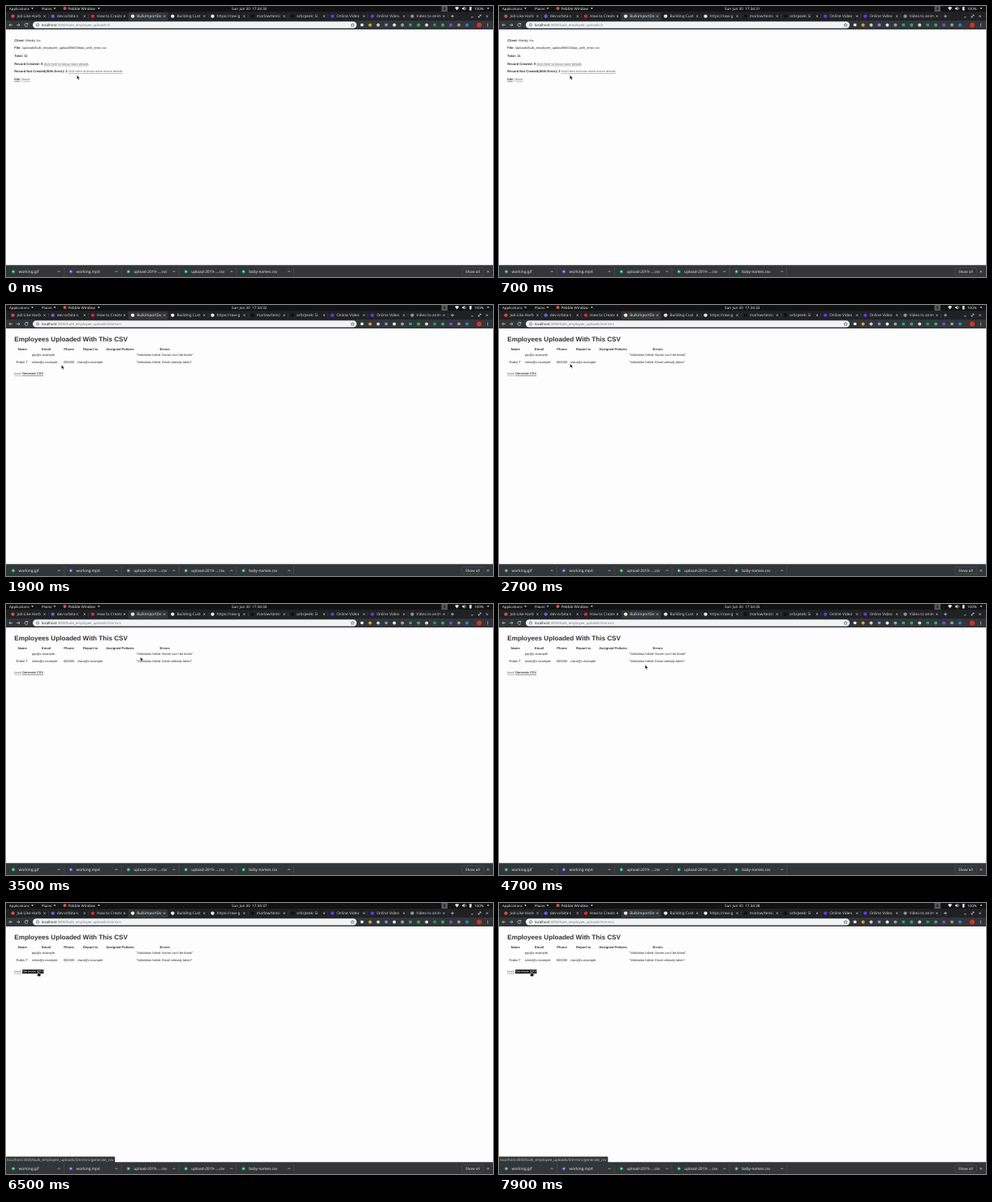
Write an HTML page that moves like this. It is 600x335 px and loops after 8 s.

```html
<!DOCTYPE html>
<html lang="en">
<head>
<meta charset="utf-8">
<title>CSV upload errors</title>
<style>
html, body { margin: 0; width: 100%; height: 100%; overflow: hidden; background: #fdfdfd; }
svg { display: block; width: 600px; height: 335px; }
text { white-space: pre; text-rendering: geometricPrecision; }
.ui { font-family: "Noto Sans", "Open Sans", sans-serif; }
.page { font: 4.0625px "Liberation Sans", Arial, sans-serif; fill: #333; }
.page .h1 { font-size: 8.125px; }
.b { font-weight: bold; }
.link { fill: #000; text-decoration: underline; }
.seen { fill: #666; text-decoration: underline; }
.hover .target { fill: #fff; }
.mark { visibility: hidden; }
.hover .mark { visibility: visible; }
.line { fill: none; stroke: #dfe1e3; stroke-width: .65; }
.dark { stroke: #5f6368; }
</style>
</head>
<body>
<svg id="stage" viewBox="0 0 600 335"></svg>
<script>
const stage = document.getElementById('stage');
const LOOP = 8000;
const LIGHT = '#e4e6e8', DIM = '#cdd0d3', BAR = '#323639', DARK = '#202124', FIELD = '#f1f3f4';
const HOST = 'localhost:3000/bulk_employee_uploads/3';

const rect = (x, y, w, h, fill, r = 0, more = '') =>
  `<rect x="${x}" y="${y}" width="${w}" height="${h}" fill="${fill}" rx="${r}" ${more}/>`;
const dot = (x, y, r, fill) => `<circle cx="${x}" cy="${y}" r="${r}" fill="${fill}"/>`;
const line = (d, cls = '') => `<path class="line ${cls}" d="${d}"/>`;
const ui = (x, y, s, size = 4.6, fill = LIGHT, more = '') =>
  `<text class="ui" x="${x}" y="${y}" font-size="${size}" fill="${fill}" ${more}>${s}</text>`;
const text = (x, y, s, cls = '', more = '') => `<text x="${x}" y="${y}" class="${cls}" ${more}>${s}</text>`;
const span = (cls, s) => `<tspan class="${cls}">${s}</tspan>`;
const cross = (x, y, r) => line(`M${x - r} ${y - r}l${2 * r} ${2 * r}m0 ${-2 * r}l${-2 * r} ${2 * r}`);
const caret = (x, y) => `<path d="M${x - 1.4} ${y - .7}h2.8l-1.4 1.7z" fill="${LIGHT}"/>`;

function desktopBar() {
  return rect(0, 0, 600, 7, '#121212') +
    ui(4, 4.6, 'Applications', 4.3) + caret(32.5, 3) +
    ui(44, 4.6, 'Places', 4.3) + caret(60, 3) +
    dot(72.5, 3, 2, '#dd5144') + ui(76.5, 4.6, 'Pebble Window', 4.6) + caret(114.3, 3) +
    ui(278, 4.6, '', 4.6, LIGHT, 'id="clock"') +
    rect(536.5, 0, 7.5, 7, '#55585a') + rect(539.3, 1.3, 1.8, 4, '#25282a', .8) +
    `<path d="M553 2q2.6-2.2 5.2 0l-2.6 3.4z" fill="${LIGHT}"/>` +
    `<path d="M562 2.2h1.3l1.6-1.4v4.6l-1.6-1.4H562z" fill="${LIGHT}"/>` + line('M566 1.6q1.2 1.5 0 3') +
    rect(571, 1, 2.5, 4.6, LIGHT, .4) + ui(577, 4.6, '100%', 4.5) + caret(594, 3);
}

function tabs() {
  const list = [
    ['Job Like Harb', '#d94a3f'], ['dev-orbita-s', '#6a5be0'], ['How to Create', '#e0262d'],
    ['BulkimportDe', '#f3ecd2'], ['Building Cust', LIGHT], ['https://raw-g', LIGHT],
    ['marlow/tensi', '#0f1011'], ['orb/peek: Si', '#0f1011'], ['Online Video', '#6336e6'],
    ['Online Video', '#6336e6'], ['Video to anim', '#8d9094']
  ];
  const PITCH = 49.2;
  let out = rect(0, 7, 600, 12, DARK) + rect(150.5, 8, 49, 11, BAR, 1.8);
  list.forEach(([label, color], i) => {
    const x = 8.5 + i * PITCH, active = i === 3;
    out += dot(x, 12.6, 2.2, color) + ui(x + 5.1, 14.3, label, 4.7, active ? LIGHT : DIM) +
      rect(x + 35, 9, 2.5, 8, active ? BAR : DARK, 0, 'opacity=".6"') + cross(x + 39, 12.6, 1.1);
    if (i !== 2 && !active) out += rect(x + 43.6, 10, .35, 5.4, '#5f6368');
  });
  return out + line('M548 12.6h4m-2-2v4') + line('M573 13.8h2.6') +
    line('M582 14l3-3m-1.6 0h1.6v1.6m-3-.2v1.6h1.6') + cross(592.6, 12.6, 1.2);
}

function toolbar() {
  const icons = ['#e8e8e8', '#e59a35', '#c9ccd0', '#7f8fd8', '#dfe5f2', '#999ea3', '#20a98a',
    '#2fae55', '#d5d7d9', '#20a05a', '#2fae70', '#7a48e0', '#9a9ea3', '#2f80d0'];
  let out = rect(0, 18, 600, 11, BAR) + rect(33, 19.2, 399, 8.4, FIELD, 4.2) +
    line('M8 23.4H4m1.8-1.8L4 23.4l1.8 1.8') +
    line('M13 23.4h4m-1.8-1.8l1.8 1.8l-1.8 1.8') +
    line('M26.6 22.2a2 2 0 1 0 .3 1.7m0-3v1.6h-1.6') +
    '<circle class="line dark" cx="39" cy="23.4" r="1.7"/>' + line('M39 23.2v1.2', 'dark') +
    ui(44, 25, 'localhost<tspan fill="#777b80">:3000/bulk_employee_uploads/3<tspan id="urlTail"></tspan></tspan>', 4.34, DARK) +
    line('M427 21.3l.6 1.5 1.6.1-1.2 1 .4 1.6-1.4-.9-1.4.9.4-1.6-1.2-1 1.6-.1z', 'dark');
  icons.forEach((color, i) => {
    const x = 438.6 + i * 9.95;
    out += i % 3 ? dot(x, 23.4, 2, color) : rect(x - 1.7, 21.7, 3.4, 3.4, color, .5);
  });
  out += dot(583, 23.4, 3, '#d93025');
  for (let i = -1; i < 2; i++) out += dot(593.5, 23.4 + i * 1.5, .5, LIGHT);
  return out;
}

function shelf() {
  const files = ['working.gif', 'working.mp4', 'upload-2019-....csv', 'upload-2019-....csv', 'baby-names.csv'];
  let out = rect(0, 320.3, 600, 14.7, BAR);
  files.forEach((name, i) => {
    const x = i * 70.9;
    out += dot(x + 9, 328.4, 2.1, i === 1 ? '#6b4fd8' : '#1fa463') + dot(x + 9, 328.4, .8, LIGHT) +
      ui(x + 15.6, 330.4, name, 4.7) +
      line(`M${x + 63.6} 329.1l1.5-1.5 1.5 1.5`) + rect(x + 71, 323, .4, 10.5, '#5f6368');
  });
  return out + rect(561.5, 323.7, 27, 9, 'none', 1.2, 'stroke="#5f6368" stroke-width=".4"') +
    ui(566, 330.4, 'Show all') + cross(593.8, 328.4, 1.2);
}

function recordPage() {
  const row = (i, s) => text(10.3, 43.7 + i * 9.69, s);
  return row(0, span('b', 'Client:') + ' Wexby Inc') +
    row(1, span('b', 'File:') + ' /uploads/bulk_employee_upload/file/3/data_with_error.csv') +
    row(2, span('b', 'Total: 11')) +
    row(3, span('b', 'Record Created: 9 ') + span('seen', 'click here to know more details')) +
    rect(76.8, 78.7, 67.2, 4.9, '#000', 0, 'class="mark"') +
    row(4, span('b', 'Record Not Created(With Error): 2 ') +
      span('seen target', 'click here to know more errors details')) +
    row(5, span('link', 'Edit') + ' | ' + span('seen', 'Back'));
}

function errorPage() {
  const heads = [['Name', 20.2], ['Email', 49.5], ['Phone', 77.5], ['Report to', 104],
    ['Assigned Policies', 140.5], ['Errors', 195.7]];
  return text(10.3, 45.3, 'Employees Uploaded With This CSV', 'h1 b') +
    heads.map(([s, x]) => text(x, 55.7, s, 'b', 'text-anchor="middle"')).join('') +
    text(32, 63.4, 'pip@x.example') + text(160.3, 63.4, '"Validation failed: Name can\'t be blank"') +
    text(12.6, 72, 'Robin T') + text(32, 72, 'robin@x.example') + text(70.8, 72, '000000') +
    text(88, 72, 'clara@x.example') + text(160.3, 72, '"Validation failed: Email already taken"') +
    text(10.3, 86.2, 'back', 'seen') + rect(19.9, 82.4, 26.5, 4.9, '#000', 0, 'class="mark"') +
    text(19.9, 86.2, 'Generate CSV', 'link target');
}

stage.innerHTML = rect(0, 0, 600, 335, '#fdfdfd') +
  `<g class="page" id="records">${recordPage()}</g><g class="page" id="errors">${errorPage()}</g>` +
  `<g id="status"><path id="bubble" fill="${BAR}"/>${ui(1, 318.7, '', 4.52, '#c3c6c9', 'id="address"')}</g>` +
  desktopBar() + tabs() + toolbar() + shelf() +
  `<g id="cursor" stroke="#fff" stroke-width=".5" fill="#000" stroke-linejoin="round">
    <path id="arrow" d="M0 0v5l1.2-1 .8 1.9 1-.4-.8-1.8h1.6z"/>
    <path id="hand" d="M-.6 0q.6-.6 1.1 0v2l2.3.5q.5.2.4.9l-.5 2.4h-3l-1.6-2.2q0-.8.9-.4l.4.4z"/>
  </g>`;

const el = id => document.getElementById(id);
const show = (id, on) => { el(id).style.display = on ? '' : 'none'; };

// Cursor tip: time, x, y
const path = [
  [0, 87.3, 85.6], [700, 87.3, 85.6], [1100, 90, 81], [1500, 90, 81], [1900, 68.3, 74],
  [2400, 70, 74], [3500, 165.6, 65.6], [3800, 166, 66], [4700, 180, 75.3], [5500, 112, 91],
  [5900, 42.2, 85], [6300, 39.7, 85], [LOOP, 39.7, 85]
];

function cursorAt(t) {
  const i = path.findIndex(p => p[0] > t);
  const [t0, x0, y0] = path[i - 1], [t1, x1, y1] = path[i];
  const u = (t - t0) / (t1 - t0), k = u * u * (3 - 2 * u);
  return [x0 + (x1 - x0) * k, y0 + (y1 - y0) * k];
}

function draw(now) {
  const t = Math.floor(now % LOOP / 100) * 100;
  const first = t < 1600;
  const hover = first ? t >= 1000 : t >= 5900;
  const status = first ? t >= 1200 : t >= 6100;
  show('records', first);
  show('errors', !first);
  el(first ? 'records' : 'errors').classList.toggle('hover', hover);
  el('urlTail').textContent = first ? '' : '/errors';
  el('clock').textContent = `Sun Jun 30  17:34:${30 + Math.floor((t + 750) / 1000)}`;
  show('status', status);
  el('address').textContent = HOST + (first ? '/errors' : '/errors/generate_csv');
  el('bubble').setAttribute('d', `M0 313.4h${first ? 103 : 133}q1.3 0 1.3 1.3v6.3H0z`);
  show('arrow', !hover);
  show('hand', hover);
  el('cursor').setAttribute('transform', `translate(${cursorAt(t)})`);
  requestAnimationFrame(draw);
}
requestAnimationFrame(draw);
</script>
</body>
</html>
```
